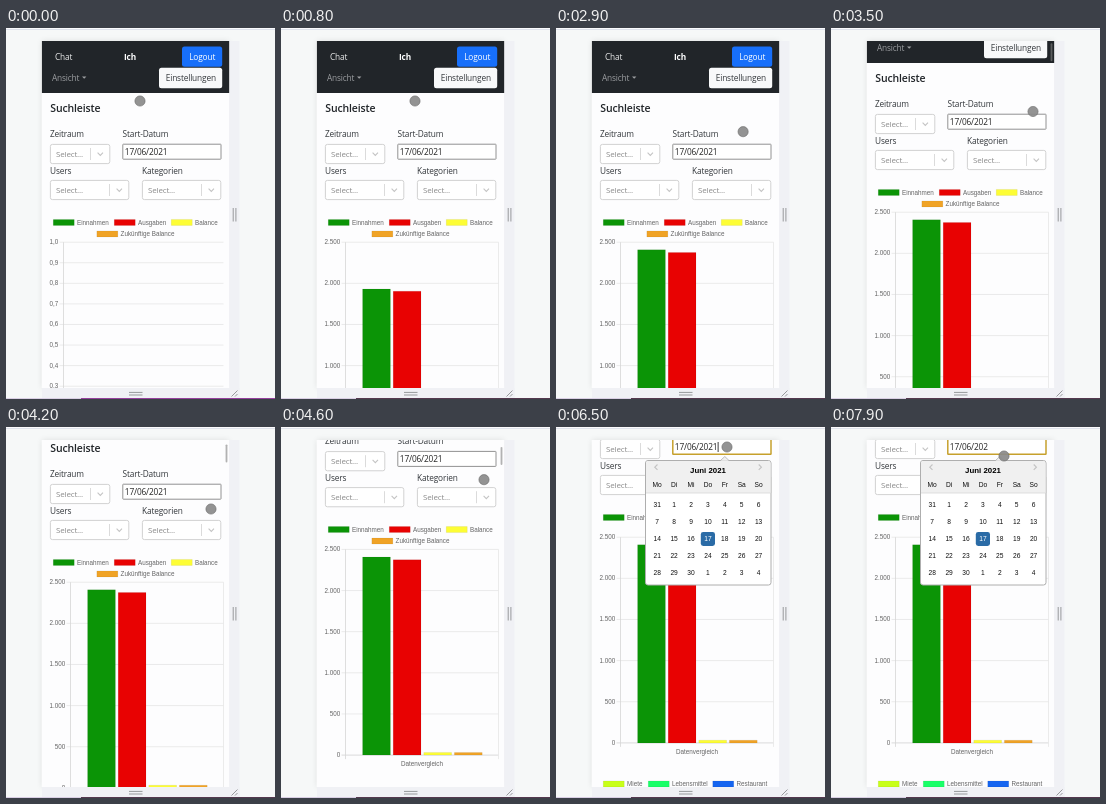
An HTML page with a canvas that plays this animation: 269 px wide and 371 px high, repeating every 8 s.

```html
<!DOCTYPE html>
<html lang="de">
<head>
<meta charset="utf-8">
<title>Suchleiste</title>
<style>
html, body { margin: 0; width: 100%; height: 100%; overflow: hidden; background: #f6f8f8; }
canvas { display: block; width: 269px; height: 371px; }
</style>
</head>
<body>
<canvas id="stage"></canvas>
<script>
const W = 269, H = 371, LOOP = 8000, STEP = 100;
const UI = '"Open Sans", "Noto Sans", sans-serif';
const ARIAL = '"Liberation Sans", Arial, sans-serif';
const GREEN = '#0b9406', RED = '#e80202', YELLOW = '#fdfd35', ORANGE = '#f0a326';
const VIEW = { x: 35.7, y: 13, w: 187.7, h: 347 };
const LOADED = 400, BARS_FROM = 450, BARS_MS = 1050;
const PICKER_OPEN = 6000, ERASE = 7800;

const canvas = document.getElementById('stage');
const ctx = canvas.getContext('2d');
const dpr = window.devicePixelRatio || 1;
canvas.width = W * dpr;
canvas.height = H * dpr;

// Keyframes: [time, value, ...]
const POINTER = [
  [0, 134, 73], [1900, 134, 73], [2000, 135, 71], [2200, 135, 71],
  [3100, 202, 113], [3200, 202, 113], [3800, 202, 54], [4200, 205, 82],
  [4800, 202, 38], [5300, 198, 27], [5900, 182, 20], [6500, 171, 20],
  [7300, 171, 20], [7900, 173, 29]
];
const SCROLL = [[3200, 0], [3500, 30], [3800, 59], [4200, 59], [4700, 100], [4900, 104]];

function track(keys, t) {
  if (t <= keys[0][0]) return keys[0].slice(1);
  for (let i = 1; i < keys.length; i++) {
    const [a, ...from] = keys[i - 1], [b, ...to] = keys[i];
    if (t <= b) return from.map((v, k) => v + (to[k] - v) * (t - a) / (b - a));
  }
  return keys[keys.length - 1].slice(1);
}

function rect(x, y, w, h, fill) {
  ctx.fillStyle = fill;
  ctx.fillRect(x, y, w, h);
}

function box(x, y, w, h, r, fill, stroke, lw = 1) {
  ctx.beginPath();
  ctx.roundRect(x, y, w, h, r);
  if (fill) { ctx.fillStyle = fill; ctx.fill(); }
  if (stroke) { ctx.strokeStyle = stroke; ctx.lineWidth = lw; ctx.stroke(); }
}

function path(color, lw, ...pts) {
  ctx.beginPath();
  pts.forEach(([x, y]) => ctx.lineTo(x, y));
  ctx.strokeStyle = color;
  ctx.lineWidth = lw;
  ctx.stroke();
}

function text(str, x, y, color = '#33373b', font = '8.3px ' + UI, align = 'left') {
  ctx.font = font;
  ctx.letterSpacing = font.includes(UI) ? '-0.15px' : '0px';
  ctx.fillStyle = color;
  ctx.textAlign = align;
  ctx.fillText(str, x, y);
}

const small = (str, x, y, align) => text(str, x, y, '#666', '6.3px ' + ARIAL, align);

function drawNav() {
  rect(VIEW.x, 13, VIEW.w, 52, '#212529');
  text('Chat', 49, 31.6, '#e9eaea');
  text('Ich', 118, 31.6, '#fff', 'bold 8.3px ' + UI);
  box(176, 18.4, 40.2, 20.3, 2.5, '#176ffa');
  text('Logout', 196.2, 31.6, '#fff', undefined, 'center');
  text('Ansicht', 46, 53, '#9b9da0');
  ctx.beginPath();
  ctx.moveTo(76, 48.5);
  ctx.lineTo(80.4, 48.5);
  ctx.lineTo(78.2, 50.8);
  ctx.fillStyle = '#9b9da0';
  ctx.fill();
  box(153, 39.8, 63.2, 20.5, 2.5, '#f8f9fa');
  text('Einstellungen', 184.8, 53, undefined, undefined, 'center');
}

function drawSelect(x, y, w) {
  box(x + .4, y + .4, w - .6, 19.2, 2, '#fff', '#d2d2d2');
  text('Select...', x + 6, y + 13.2, '#8a8a8a', '8px ' + UI);
  rect(x + w - 20, y + 4, .8, 12, '#d2d2d2');
  const cx = x + w - 9.7;
  path('#c4c4c4', 1.1, [cx - 2.7, y + 8.7], [cx, y + 11.4], [cx + 2.7, y + 8.7]);
}

function drawForm(t) {
  text('Suchleiste', 44.3, 84, '#212529', '600 10.5px ' + UI);
  text('Zeitraum', 44, 109);
  text('Start-Datum', 116.5, 109);
  drawSelect(44, 116, 60);

  const focused = t >= PICKER_OPEN;
  box(116.8, 116.2, 98.2, 15, .5, '#fff', focused ? '#c6a02c' : '#929292', focused ? 1.5 : 1);
  text(t >= ERASE ? '17/06/202' : '17/06/2021', 118.8, 127, '#222');
  if (focused && t < ERASE && t % 1000 >= 500) rect(161.7, 119, .8, 10, '#111');

  text('Users', 44, 146);
  text('Kategorien', 136, 146);
  drawSelect(44, 152, 79);
  drawSelect(136, 152, 79);
}

function legend(x, y, color, label) {
  box(x + .25, y - 3.1, 21, 6, 0, color, 'rgba(0,0,0,.12)', .5);
  small(label, x + 24, y + 2.1);
}

function drawChart(t) {
  legend(47, 194.5, GREEN, 'Einnahmen');
  legend(108, 194.5, RED, 'Ausgaben');
  legend(165, 194.5, YELLOW, 'Balance');
  legend(90.6, 206, ORANGE, 'Zukünftige Balance');

  const loaded = t >= LOADED;
  const top = 214.2, height = 205.7, left = loaded ? 64.5 : 57.5, right = 217.5;
  const ticks = loaded ? 5 : 10;
  for (let i = 0; i <= ticks; i++) {
    const y = top + height * i / ticks, n = ticks - i;
    const label = loaded ? (n * 500).toLocaleString('de-DE') : (n / 10).toFixed(1).replace('.', ',');
    path(i === ticks ? '#d2d2d2' : '#e6e6e6', .8, [left - 4, y], [right, y]);
    small(label, left - 5.2, y + 2, 'right');
  }
  path('#d6d6d6', .8, [left, top], [left, top + height + 4]);
  if (!loaded) return;
  path('#e6e6e6', .8, [right, top], [right, top + height + 4]);

  const p = Math.min(1, Math.max(0, (t - BARS_FROM) / BARS_MS));
  const grow = 1 - (1 - p) ** 4;
  const base = top + height;
  [[2408, GREEN], [2374, RED], [33, YELLOW], [33, ORANGE]].forEach(([v, color], i) => {
    const h = height * v / 2500 * grow;
    if (h > 0) box(81.6 + i * 30.6, base - h, 27.8, h, 0, color, 'rgba(0,0,0,.12)', .5);
  });

  small('Datenvergleich', 141, 431, 'center');
  legend(47, 461, '#c8ff19', 'Miete');
  legend(92, 461, '#19ff68', 'Lebensmittel');
  legend(156.5, 461, '#1464f0', 'Restaurant');
}

function drawPicker() {
  box(89.5, 33.5, 125.5, 124.5, 2.5, '#fff', '#aeaeae');
  box(90, 34, 124.5, 32, [2, 2, 0, 0], '#f0f0f0');
  path('#d2d2d2', .7, [90, 66], [214.5, 66]);
  ctx.beginPath();
  ctx.moveTo(164.5, 33.8);
  ctx.lineTo(168.8, 29.5);
  ctx.lineTo(173, 33.8);
  ctx.fillStyle = '#f0f0f0';
  ctx.fill();
  path('#aeaeae', .8, [164.5, 33.5], [168.8, 29.5], [173, 33.5]);
  path('#c4c4c4', 1.2, [101.5, 37.5], [98.8, 40.2], [101.5, 42.9]);
  path('#c4c4c4', 1.2, [202.7, 37.5], [205.4, 40.2], [202.7, 42.9]);
  text('Juni 2021', 152, 46, '#000', 'bold 7.87px ' + ARIAL, 'center');

  const font = '6.66px ' + ARIAL;
  const colX = c => 101.2 + c * 16.9;
  ['Mo', 'Di', 'Mi', 'Do', 'Fr', 'Sa', 'So'].forEach((d, c) =>
    text(d, colX(c), 60.3, '#111', font, 'center'));
  for (let i = 0; i < 35; i++) {
    const day = i === 0 ? 31 : i > 30 ? i - 30 : i;
    const x = colX(i % 7), y = 78 + Math.floor(i / 7) * 17;
    if (i === 17) box(x - 7.1, y - 7, 14.2, 14, 2.4, '#2a6ba6');
    text(day, x, y + 2.4, i === 17 ? '#fff' : '#111', font, 'center');
  }
}

function drawFrame(t) {
  rect(0, 0, W, H, '#f6f8f8');
  rect(0, 0, W, 1, '#fbfbfd');
  rect(0, 1, W, 1, '#dfe3ec');
  ctx.save();
  ctx.shadowColor = 'rgba(0,0,0,.1)';
  ctx.shadowBlur = 6 * dpr;
  rect(VIEW.x, VIEW.y, VIEW.w, VIEW.h, '#fdfdfe');
  ctx.restore();
  rect(223.4, 13, 10.1, 358, '#f0f1f5');
  rect(36, 360, 197.5, 11, '#f0f1f5');
  [226.7, 229.4].forEach(x => rect(x, 180, 1, 13.5, '#97999c'));
  [363.9, 366.5].forEach(y => rect(123, y, 13.5, 1, '#97999c'));
  path('#8d8f92', .9, [225.5, 368.5], [231.5, 362.5]);
  path('#8d8f92', .9, [229, 368.5], [231.5, 366]);
  rect(0, 370, 75, 1, '#d9cfe4');
  rect(75, 370, W - 75, 1, t < LOADED ? '#94409c' : '#54394f');
}

function drawPointer(x, y) {
  ctx.beginPath();
  ctx.arc(x, y, 5.1, 0, Math.PI * 2);
  ctx.fillStyle = 'rgba(138,138,138,.92)';
  ctx.fill();
  ctx.strokeStyle = 'rgba(105,105,105,.6)';
  ctx.lineWidth = 1;
  ctx.stroke();
}

function draw(t) {
  const [scroll] = track(SCROLL, t);
  const [px, py] = track(POINTER, t);
  ctx.setTransform(dpr, 0, 0, dpr, 0, 0);
  drawFrame(t);

  ctx.save();
  ctx.beginPath();
  ctx.rect(VIEW.x, VIEW.y, VIEW.w, VIEW.h);
  ctx.clip();
  ctx.translate(0, -scroll);
  drawNav();
  drawForm(t);
  drawChart(t);
  ctx.translate(0, scroll);
  if (t >= PICKER_OPEN) drawPicker();
  if (t > 3200 && t < 5000) box(219.6, 13 + scroll * .075, 1.8, 18, .9, 'rgba(128,128,128,.6)');
  ctx.restore();

  drawPointer(px, py);
}

const start = performance.now();
function tick() {
  const t = (performance.now() - start) % LOOP;
  draw(Math.floor(t / STEP) * STEP);
  requestAnimationFrame(tick);
}
tick();
</script>
</body>
</html>
```
